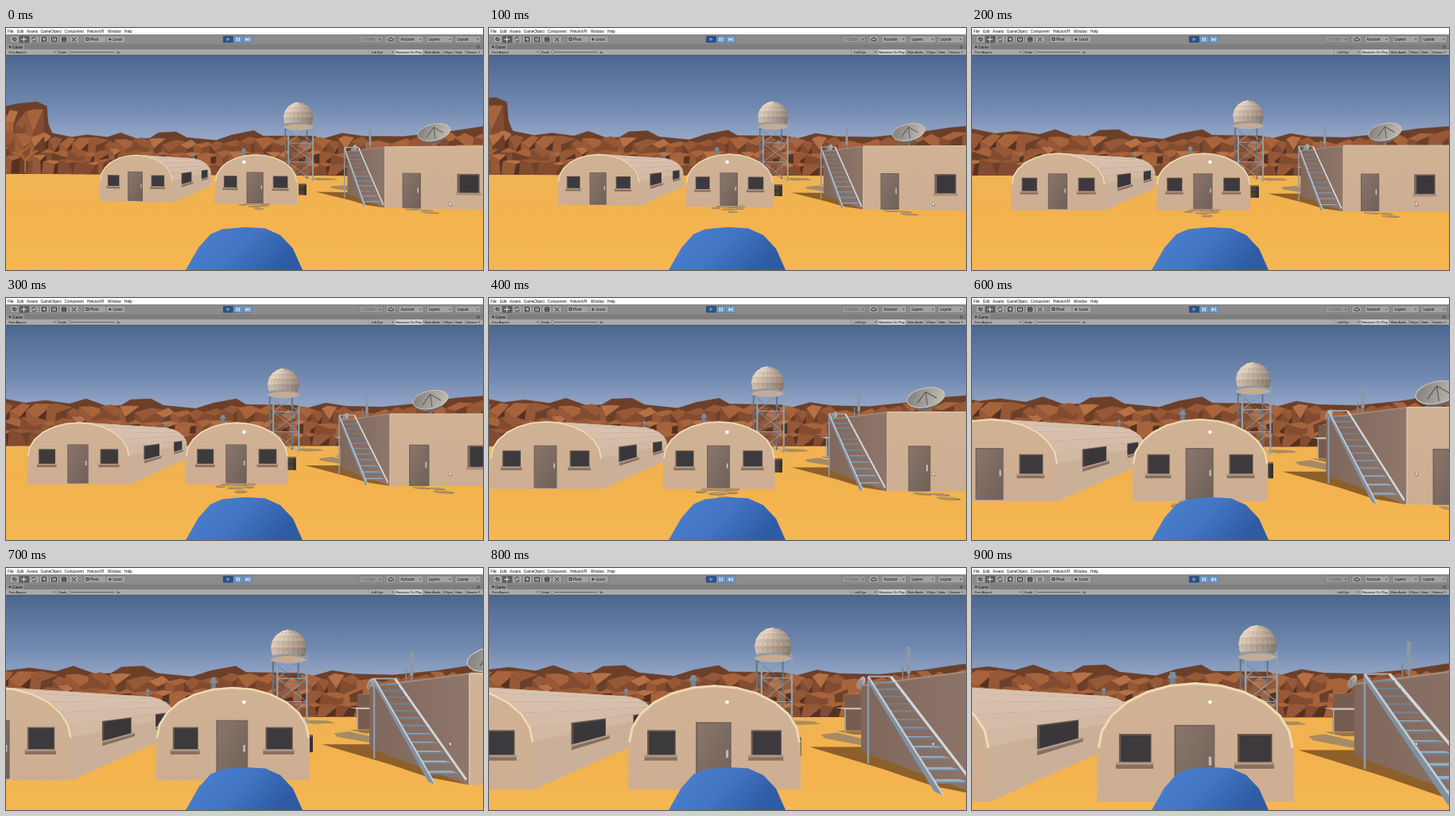
An HTML page that plays this animation: 600x305 px, repeating every 1 s.

```html
<!DOCTYPE html>
<html lang="en">
<head>
<meta charset="utf-8">
<title>Desert base walk</title>
<style>
html, body { margin: 0; width: 100%; height: 100%; overflow: hidden; background: #8c8c8c; }
svg { display: block; width: 100vw; height: 100vh; }
text { font: 4.7px "Liberation Sans", Arial, sans-serif; fill: #0c0c0c; }
.small text { font-size: 4px; }
</style>
</head>
<body>
<svg viewBox="0 0 600 305">
  <defs>
    <linearGradient id="sky" x2="0" y2="1">
      <stop offset="0" stop-color="#4c678f"/><stop offset=".45" stop-color="#7189b0"/>
      <stop offset=".75" stop-color="#9aabca"/><stop offset="1" stop-color="#b4c0d8"/>
    </linearGradient>
    <linearGradient id="sand" x2="0" y2="1">
      <stop offset="0" stop-color="#f0b454"/><stop offset=".4" stop-color="#f2b24e"/><stop offset="1" stop-color="#f5b752"/>
    </linearGradient>
    <linearGradient id="front" x2="0" y2="1">
      <stop offset="0" stop-color="#d0b295"/><stop offset="1" stop-color="#cdae92"/>
    </linearGradient>
    <linearGradient id="side" x2="1" y2="0">
      <stop offset="0" stop-color="#7f675c"/><stop offset="1" stop-color="#8f766a"/>
    </linearGradient>
    <linearGradient id="door" x2="1" y2="1">
      <stop offset="0" stop-color="#8a766b"/><stop offset="1" stop-color="#6f6057"/>
    </linearGradient>
    <linearGradient id="dish" x2="1" y2=".3">
      <stop offset="0" stop-color="#7d7b79"/><stop offset="1" stop-color="#bdb6ad"/>
    </linearGradient>
    <linearGradient id="ball" x2="1" y2=".35">
      <stop offset="0" stop-color="#4c82d2"/><stop offset=".55" stop-color="#4275c4"/><stop offset="1" stop-color="#2f5ba5"/>
    </linearGradient>
  </defs>
  <rect y="34" width="600" height="146" fill="url(#sky)"/>
  <rect y="178" width="600" height="127" fill="url(#sand)"/>
  <g id="scene"></g>
  <path d="M226 305L242 277 257 260 272 253.5 300 251 326 252.5 345 261 361 278 373 305Z" fill="url(#ball)"/>
  <circle cx="299.5" cy="169" r="2.3" fill="#fff"/>
  <path d="M557.5 219v5l1.2-1 1 2 .8-.4-.9-2h1.6z" fill="#fff" stroke="#333" stroke-width=".4"/>
  <g id="bars"></g>
</svg>
<script>
const FOCAL = 234, EYE = 4.94, LENGTH = 18;
const DIST = [22.7, 21.3, 19.85, 18.2, 16.65, 15.2, 13.72, 12.1, 10.8, 9.47];
const YAW = [.0915, .045];
let dist, cos, sin;

const rnd = n => { const v = Math.sin(n * 12.9898) * 43758.5453; return v - Math.floor(v); };
const mix = (a, b, t) => a.map((v, i) => v + (b[i] - v) * t);
const rgb = c => `rgb(${c.map(Math.round)})`;

// World units to screen: x across, y above the ground, z beyond the hut fronts.
function depth(x, z) { return (dist + z) * cos - x * sin; }
function at(x, y, z) {
  const d = depth(x, z);
  return [300 + FOCAL * (x * cos + (dist + z) * sin) / d, 170 + FOCAL * (EYE - y) / d];
}
const str = pts => pts.map(p => p[0].toFixed(1) + ',' + p[1].toFixed(1)).join(' ');
const flat = (pts, fill, extra = '') => `<polygon points="${str(pts)}" fill="${fill}" ${extra}/>`;
const poly = (pts, fill, extra) => flat(pts.map(p => at(...p)), fill, extra);
const seam = c => `stroke="${c}" stroke-width=".4"`;
const line = (pts, color, w) =>
  `<polyline points="${str(pts.map(p => at(...p)))}" fill="none" stroke="${color}" stroke-width="${(w * FOCAL / depth(pts[0][0], pts[0][2])).toFixed(2)}" stroke-linejoin="round"/>`;
const panel = (x0, x1, y0, y1, z, fill) => poly([[x0, y0, z], [x1, y0, z], [x1, y1, z], [x0, y1, z]], fill);
const wall = (x, z0, z1, y0, y1, fill) => poly([[x, y0, z0], [x, y0, z1], [x, y1, z1], [x, y1, z0]], fill);
const ground = (pts, fill) => poly(pts.map(([x, z]) => [x, 0, z]), fill);

// Cliffs: a skyline with three rows of faceted boulders in front of it.
const SKYLINE = [[-160, 95], [-110, 92], [-58, 83], [-25, 81], [-9, 88], [-7, 112], [-3, 122], [0, 127], [30, 133],
  [55, 130], [85, 134], [105, 128], [130, 137], [148, 136], [160, 129], [185, 128], [200, 136], [240, 140],
  [262, 133], [290, 128], [302, 135], [365, 136], [375, 140], [400, 133], [425, 137], [470, 138], [520, 133],
  [560, 127], [600, 124], [800, 122]];
const ROCK = ['#553122', '#6c3f29', '#834c30', '#965836', '#a7633b', '#b57145'];
const FAR = 84, FOOT = 185.5;
const onCliff = ([x, y]) => [(x - 300) * FAR / FOCAL, EYE + (170 - y) * FAR / FOCAL, 64];
function skyline(x) {
  const i = Math.max(1, SKYLINE.findIndex(p => p[0] >= x));
  const [a, b] = [SKYLINE[i - 1], SKYLINE[i]];
  return a[1] + (b[1] - a[1]) * (x - a[0]) / (b[0] - a[0]);
}
const facets = [{ pts: [...SKYLINE, [800, FOOT], [-160, FOOT]].map(onCliff), color: ROCK[1] }];
function addRock(x, top, w, seed) {
  const r = k => rnd(seed + k * .37), h = FOOT - top;
  const a = [x, top + h * .2 * r(1)], b = [x + w * (.3 + .4 * r(2)), top], c = [x + w, top + h * .18 * r(3)];
  const m = [x + w * (.25 + .45 * r(4)), top + h * (.18 + .22 * r(5))], n = [x + w * (.2 + .5 * r(6)), FOOT];
  const d = [x + w * (1 + .25 * r(7)), FOOT], e = [x - w * .2 * r(8), FOOT];
  [[[a, b, c, m], 3.2], [[a, m, n, e], 1.8], [[m, c, d, n], .2]].forEach(([pts, shade], k) =>
    facets.push({ pts: pts.map(onCliff), color: ROCK[Math.floor(shade + r(9 + k) * 2.6)] }));
}
for (let row = 0; row < 3; row++)
  for (let x = -150, k = 0; x < 760; k++) {
    const seed = row * 100 + k, w = 16 + 18 * rnd(seed);
    const sky = Math.max(skyline(x), skyline(x + w));
    addRock(x, sky + (FOOT - sky) * (row * .3 + .14 * rnd(seed + 50)), w, seed);
    x += w * .78;
  }
const cliffs = () => facets.map(f => poly(f.pts, f.color, seam(f.color))).join('');
function tree() {
  const x = -115, z = 58, p = (dx, y) => [x + dx, y, z];
  return [[p(0, 0), p(0, 6), p(-3, 10), p(-5, 13)], [p(0, 6), p(3, 9), p(7, 11)], [p(-3, 10), p(1, 12), p(3, 14)],
    [p(3, 9), p(4, 13)], [p(-2, 9), p(-7, 10)]].map(b => line(b, '#a76a35', .8)).join('');
}

function tower() {
  const x = 10.7, z = 33, w = 3.3, top = 15.6, steel = '#93a0ab', dark = '#66737f';
  let out = '';
  for (const dz of [w, -w]) {
    const color = dz > 0 ? dark : steel;
    for (let k = 0; k < 3; k++) {
      const y0 = top * k / 3, y1 = top * (k + 1) / 3;
      out += line([[x - w, y0, z + dz], [x + w, y1, z + dz]], color, .17) + line([[x + w, y0, z + dz], [x - w, y1, z + dz]], color, .17)
        + line([[x - w, y1, z + dz], [x + w, y1, z + dz]], color, .2);
    }
    for (const dx of [-w, w]) out += line([[x + dx, 0, z + dz], [x + dx, top, z + dz]], color, .42);
  }
  const [cx, cy] = at(x, 18.3, z), s = FOCAL / depth(x, z), r = 4.3 * s;
  const ball = (lat, lon) => [cx + r * Math.cos(lat) * Math.sin(lon), cy - r * Math.sin(lat)];
  for (let i = 0; i < 6; i++)
    for (let j = 0; j < 10; j++) {
      const a0 = -.75 + i * .387, a1 = a0 + .387, b0 = (j / 10 - .5) * Math.PI, b1 = b0 + Math.PI / 10, m = (b0 + b1) / 2;
      const light = .5 + .32 * Math.sin(a0 + .2) - .32 * Math.sin(m);
      [[ball(a0, b0), ball(a0, b1), ball(a1, m)], [ball(a1, m), ball(a1, b1 + .16), ball(a0, b1)]].forEach((t, k) => {
        const c = rgb(mix([124, 106, 94], [236, 218, 196], Math.min(1, Math.max(0, light + (k ? -.07 : .07)))));
        out += flat(t, c, seam(c));
      });
    }
  // The ring is seen from below.
  const [px, py] = at(x, 15.6, z), rx = 4.25 * s, ry = .95 * s;
  return out + `<ellipse cx="${px}" cy="${py}" rx="${rx}" ry="${ry}" fill="#c7ab90"/>`
    + `<path d="M${px - rx} ${py}A${rx} ${ry} 0 0 1 ${px + rx} ${py}" fill="none" stroke="#8d99a4" stroke-width="${.5 * s}"/>`
    + `<path d="M${px - rx} ${py}A${rx} ${ry} 0 0 0 ${px + rx} ${py}" fill="none" stroke="#a9b2b9" stroke-width="${.25 * s}"/>`;
}

const profile = [[-5, -.1]];
for (let i = 0; i <= 12; i++) {
  const a = Math.PI * (1 - i / 12);
  profile.push([5 * Math.cos(a), 2.7 + 3.28 * Math.sin(a)]);
}
profile.push([5, -.1]);

function hutWindow(x0, x1) {
  return panel(x0, x1, 1.9, 3.36, 0, '#6b5b50') + panel(x0 + .1, x1 - .05, 1.9, 3.28, 0, '#3d3a3e')
    + panel(x0 - .16, x1 + .1, 1.58, 1.9, 0, '#87705f') + panel(x0 - .16, x1 + .1, 1.78, 1.92, 0, '#b2967e');
}
function hutFront(cx) {
  const arch = profile.map(([x, y]) => [cx + x, y, 0]);
  return poly(arch, 'url(#front)') + line(arch.slice(1, 14).map(([x, y]) => [cx + (x - cx) * .987, y - .05, 0]), '#f0dab2', .13)
    + panel(cx - 1.08, cx + .98, 0, 3.82, 0, '#75635a') + panel(cx - .98, cx + .92, 0, 3.74, 0, 'url(#door)')
    + line([[cx + .74, 1.75, 0], [cx + .74, 2.2, 0]], '#b9bcbf', .14)
    + hutWindow(cx - 3.9, cx - 2.25) + hutWindow(cx + 2.13, cx + 3.9);
}
function hutBody(cx) {
  let out = '';
  for (let i = 7; i < profile.length - 1; i++) {
    const [[x0, y0], [x1, y1]] = [profile[i], profile[i + 1]];
    const c = rgb(mix([203, 176, 153], [216, 194, 175], Math.min(1, Math.max(0, y1 / 5.2))));
    out += poly([[cx + x0, y0, 0], [cx + x1, y1, 0], [cx + x1, y1, LENGTH], [cx + x0, y0, LENGTH]], c, seam(c));
  }
  const x = cx + 5;
  for (const [z0, z1] of [[2.6, 6.4], [11.4, 15.3]])
    out += wall(x, z0, z1, 1.9, 3.5, '#5d5048') + wall(x, z0 + .2, z1 - .1, 1.9, 3.4, '#3a373b')
      + wall(x + .1, z0 - .1, z1 + .4, 1.55, 1.9, '#87705f') + wall(x + .1, z0 - .1, z1 + .4, 1.8, 1.95, '#b2988a');
  return out;
}
function vent(x, y0, y1, z) {
  return panel(x - .18, x + .18, y0, y1, z, '#72828f')
    + poly([[x - .34, y1 - .4, z], [x + .34, y1 - .4, z], [x + .1, y1, z], [x - .1, y1, z]], '#7f8e9a');
}
function barrel() {
  const x = 6.25, z = 6.5;
  return panel(x - .58, x + .58, 0, 1.7, z, '#4b413b') + panel(x - .58, x + .58, 1.55, 1.75, z, '#6e6259')
    + panel(x - .58, x + .58, .78, .88, z, '#332d2a') + panel(x + .2, x + .58, 0, 1.55, z, '#3a322e');
}
function dish(x, y, z, r, tilt) {
  const [cx, cy] = at(x, y, z), s = r * FOCAL / depth(x, z);
  return line([[x, 6.4, z], [x, y, z]], '#75797c', r * .14) + line([[x - r * .35, 6.4, z], [x, y - r * .3, z]], '#60656a', r * .07)
    + `<g transform="translate(${cx} ${cy}) rotate(${tilt}) scale(${s})">`
    + '<path d="M-1 0C-.8.8.6.92 1 0Z" fill="#66696c"/><ellipse rx="1" ry=".5" fill="url(#dish)" stroke="#cfcac2" stroke-width=".04"/>'
    + '<path d="M-.5.2L.05-.3.55.15M.05-.3L0 .4" fill="none" stroke="#55595d" stroke-width=".045"/></g>';
}
function shelter() {
  const z = 20, steel = '#a3a7a6';
  return panel(21, 34, 0, 6.5, 22.5, '#775d50')
    + ground([[19.3, 22], [30, 22], [30, 18], [19.6, 18]], '#99754a')
    + ground([[14.5, 18], [18, 20], [19, 12], [15.5, 11], [13.5, 15]], '#a58a66')
    + [19.5, 24.3].map(x => line([[x, 0, z], [x, 3.9, z]], steel, .22)).join('')
    + poly([[19.2, 3.9, z], [24.6, 3.9, z], [24.6, 4.1, z + 2.4], [19.2, 4.1, z + 2.4]], '#b9b0a2')
    + line([[19.2, 3.95, z], [24.6, 3.95, z]], '#c8c2b6', .22);
}
function block() {
  const x = 13.5, z = -.94, h = 6.7;
  return dish(25, 9.4, 6.8, 2.4, -12) + dish(16.3, 7.4, 11.9, .8, -62)
    + line([[15, 6.2, 4.6], [15, 9.64, 4.6]], '#7d8b97', .16) + line([[15, 7.4, 4.6], [15, 9.6, 4.6]], '#8b99a5', .32)
    + line([[14.5, 6.2, 4.6], [14.5, 7.9, 4.6]], '#7b8790', .12)
    + wall(x, z, 8, 0, h, 'url(#side)') + panel(x, 45, 0, h, z, 'url(#front)')
    + line([[x, h, z], [45, h, z]], '#d9c2a8', .1) + line([[x, h, z], [x, h, 8]], '#a1887a', .1)
    + line([[x, 0, z], [x, h, z]], '#d8bda0', .1)
    + panel(15.27, 17.15, 0, 3.85, z, '#75635a') + panel(15.37, 17.06, 0, 3.77, z, 'url(#door)')
    + line([[16.85, 1.7, z], [16.85, 2.25, z]], '#b9bcbf', .14)
    + panel(20.7, 22.85, 1.7, 3.78, z, '#75645a') + panel(20.95, 22.75, 1.8, 3.65, z, '#3b383c')
    + panel(20.55, 23, 1.5, 1.75, z, '#ab917a');
}
function stairs() {
  const x0 = 11.5, x1 = 13.35, z0 = -.9, z1 = 4.4, h = 7.1, n = 12;
  let out = line([[x0, 0, z1], [x0, h, z1]], '#8e9ba7', .16) + line([[x1, h, z1], [x0, h, z1]], '#9aa7b2', .14)
    + line([[x1, .3, z0], [x1, h, z1]], '#d3d7da', .14);
  for (let k = n; k > 0; k--) {
    const t = k / (n + 1), y = h * t, z = z0 + (z1 - z0) * t;
    out += poly([[x0, y, z], [x1, y, z], [x1, y, z + .4], [x0, y, z + .4]], '#9aadbe')
      + poly([[x0, y, z], [x1, y, z], [x1, y - .1, z], [x0, y - .1, z]], '#6f8293');
  }
  return out + poly([[x0, 0, z0], [x0, h, z1], [x0, h - .5, z1], [x0, 0, z0 + .45]], '#8091a2')
    + line([[x0, 0, z0], [x0, h, z1]], '#c3ccd4', .1);
}
function stones(list) {
  return list.map(([x, z, w]) => {
    const pts = [[x - w, z], [x - w * .6, z + .3], [x + w * .7, z + .28], [x + w, z - .1], [x + w * .3, z - .35], [x - w * .7, z - .25]];
    return ground(pts.map(([a, b]) => [a, b - .12]), '#8b6b3f') + ground(pts, '#b3946b');
  }).join('');
}

function draw(step) {
  dist = DIST[step];
  const yaw = YAW[step] || 0;
  cos = Math.cos(yaw);
  sin = Math.sin(yaw);
  scene.innerHTML = cliffs() + tree()
    + ground([[16, 31], [22, 33], [23, 39], [18, 41], [15, 36]], '#ab8c60')
    + tower() + shelter()
    + ground([[9.2, 10], [17, 10], [13.5, -.9], [12.2, .2], [11.6, 3]], '#8d5f2a')
    + ground([[-5.7, 0], [-6.05, .9], [-6.05, LENGTH], [-5.5, LENGTH]], '#8b5b2c')
    + vent(-14.5, 5, 7, 15.8) + hutBody(-16.25) + hutFront(-16.25)
    + vent(-2.4, 5.5, 6.9, 2.3) + barrel() + hutFront(-.76)
    + stones([[-1.6, -.35, .7], [-.4, -.5, .8], [.5, -.3, .6], [-2.2, -1, .5], [-.8, -1.5, .8], [.4, -1.2, .5], [-.3, -2.5, .55]])
    + block() + stones([[15.8, -1.5, .7], [17, -1.7, .6], [16.6, -2.6, .8]]) + stairs();
}

function buildBars() {
  const box = (x, y, w, h, fill) => `<rect x="${x}" y="${y}" width="${w}" height="${h}" fill="${fill}"/>`;
  const words = (y, list) => list.map(([x, t, c]) => `<text x="${x}" y="${y}"${c ? ` style="fill:${c}"` : ''}>${t}</text>`).join('');
  const button = (x, w, fill = '#a3a3a3') => `<rect x="${x}" y="10" width="${w}" height="8.6" rx="1" fill="${fill}" stroke="#626262" stroke-width=".4"/>`;
  const arrow = (x, y) => `<path d="M${x} ${y}h2.4l-1.2 1.5z" fill="#333"/>`;
  const icon = (d, c = '#222') => `<path d="${d}" fill="none" stroke="${c}" stroke-width=".9"/>`;
  bars.innerHTML = box(0, 0, 600, 8, '#fff') + box(0, 8, 600, 12.5, '#8c8c8c') + box(0, 20.5, 600, 6.5, '#7e7e7e')
    + box(0, 20.5, 23, 6.5, '#949494') + box(0, 27, 600, 7, '#a9a9a9') + box(0, 33.8, 600, .8, '#505050')
    + words(5.8, [[2, 'File'], [14, 'Edit'], [26, 'Assets'], [43.5, 'GameObject'], [73.5, 'Component'], [102, 'HelunoVR'], [128, 'Window'], [149, 'Help']])
    + [5, 17, 29.5, 42, 54.5, 67, 79.5].map((x, i) => button(x, i ? 12 : 11.5, i === 1 ? '#5c5c5c' : '#a3a3a3')).join('')
    + icon('M8 13l2 3h2l1-3M9.5 14v-2M11 14v-2.4') + icon('M19 14.3h7M22.5 11v6.6', '#eee') + icon('M32.5 14a2.7 2.7 0 0 1 5-1M38 14.8a2.7 2.7 0 0 1-5 1')
    + icon('M45.5 11.7h5v5h-5zM45 17.2l2-2') + icon('M57.5 12h6v4.8h-6zM60 14h1') + icon('M70.5 14.3h5M73 11.8v5M70.5 12h5v4.8h-5z') + icon('M83 12l5 5M88 12l-5 5')
    + button(98, 28) + button(126, 24) + icon('M101 12.5h3v3h-3z') + icon('M129 14.3h3.5M130.7 12.5v3.6') + words(16, [[106, 'Pivot'], [134.5, 'Local']])
    + button(273, 13, '#2d4f80') + button(286, 12, '#7196c4') + button(298, 12.5, '#7196c4')
    + '<path d="M277.5 11.8l4.6 2.5-4.6 2.5z" fill="#5b9bea"/>'
    + '<path d="M289.7 12h1.4v4.8h-1.4zM292.5 12h1.4v4.8h-1.4zM301.5 12l3.8 2.4-3.8 2.4zM305.5 12h1.2v4.8h-1.2z" fill="#d5e6fb"/>'
    + button(444, 30, '#969696') + button(478, 12) + button(494, 31) + button(529, 33) + button(565, 32)
    + icon('M481.5 16a1.5 1.5 0 0 1 .5-2.6 2 2 0 0 1 3.7 0 1.4 1.4 0 0 1 1 2.6z')
    + words(16, [[447, '&#10003;Collab', '#666'], [496.5, 'Account'], [531.5, 'Layers'], [567.5, 'Layout']])
    + [469, 520, 557, 592].map(x => arrow(x, 13.7)).join('')
    + '<circle cx="5" cy="23.8" r="1.4" fill="#333"/>' + words(25.5, [[8, 'Game']]) + icon('M592 23h4M592 25h4', '#444')
    + box(489, 27, 35, 6.8, '#cfcfcf') + [64, 455, 489, 524, 549, 563, 577].map(x => box(x, 27, .4, 6.8, '#757575')).join('')
    + `<g class="small">${words(32, [[3.5, 'Free Aspect'], [66, 'Scale'], [139, '1x'], [459.5, 'Left Eye'], [490.5, 'Maximize On Play'],
      [526.5, 'Mute Audio'], [550.5, 'VSync'], [565, 'Stats'], [579, 'Gizmos']])}</g>`
    + box(80, 30, 56, .9, '#606060') + '<circle cx="80" cy="30.5" r="1.6" fill="#d0d0d0" stroke="#444" stroke-width=".5"/>'
    + [60, 485, 594].map(x => arrow(x, 29.8)).join('');
}

const scene = document.getElementById('scene'), bars = document.getElementById('bars');
const start = performance.now();
let shown = -1;
function tick() {
  const step = Math.floor((performance.now() - start) % 1000 / 100);
  if (step !== shown) draw(shown = step);
  requestAnimationFrame(tick);
}
buildBars();
tick();
</script>
</body>
</html>
```
